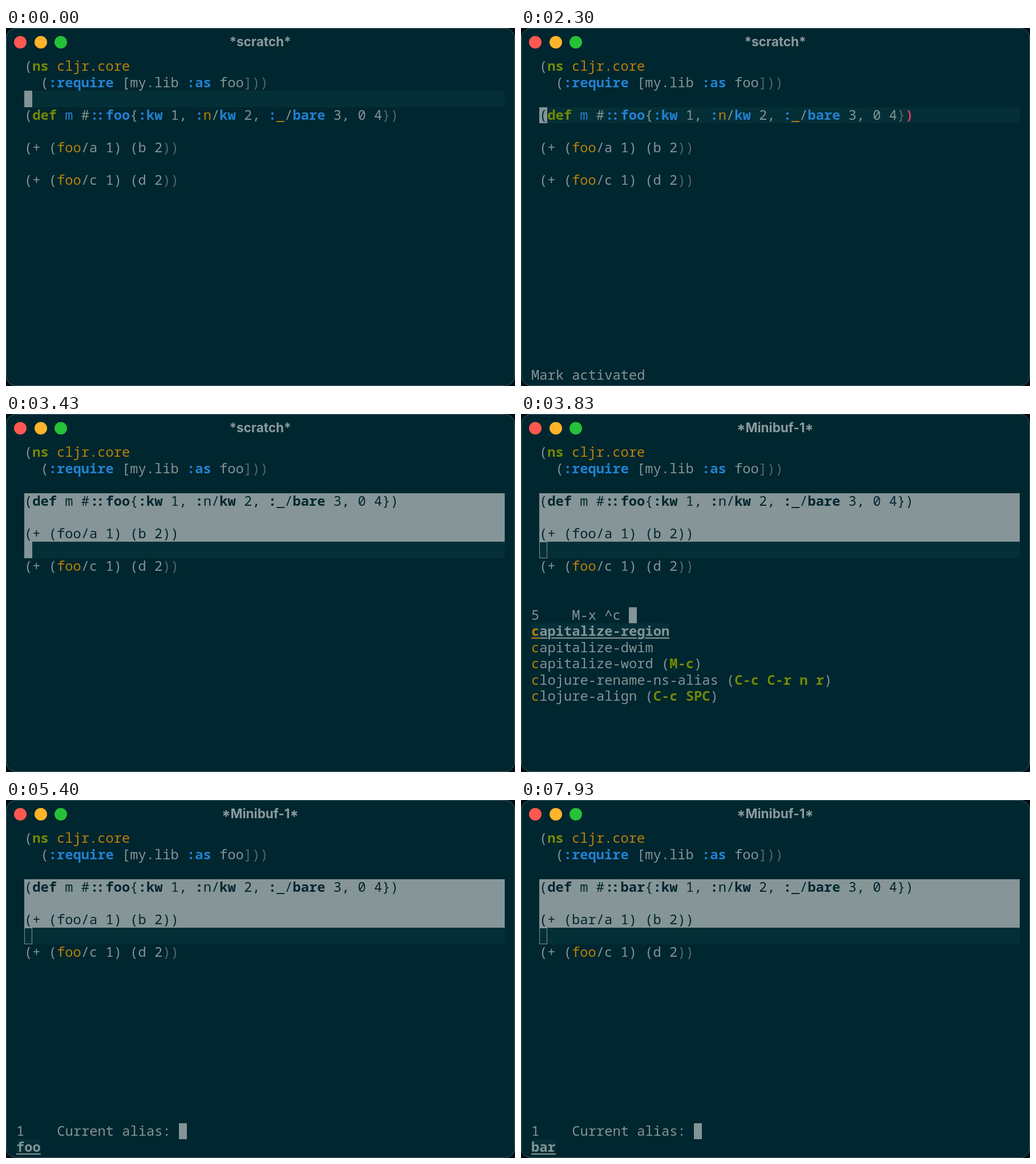
Recreate the animation shown at these times as an HTML page. Size 892 by 628 pixels, loop 8000 ms.

```html
<!DOCTYPE html>
<html lang="en">
<head>
<meta charset="utf-8">
<title>Rename alias</title>
<style>
  :root {
    --bg: #00262f; --line: #042f37; --fg: #839496; --dim: #56676b;
    --cell: 14.25px; --row: 28.53px;
  }
  html, body { margin: 0; width: 100%; height: 100%; overflow: hidden; background: #000d12; }
  #window {
    position: absolute; left: 0; top: 0; width: 892px; height: 628px; box-sizing: border-box;
    background: var(--bg); border: 1.5px solid #48626a; border-radius: 18px;
  }
  #stage { position: absolute; left: 0; top: 0; width: 892px; height: 628px; overflow: hidden; }
  .light { position: absolute; top: 14px; width: 22px; height: 22px; border-radius: 50%; }
  #title {
    position: absolute; left: 0; top: 9px; width: 891px; line-height: 30px; text-align: center;
    font: 700 22.5px/30px Inter, sans-serif; color: #8b9b9d;
  }
  .text {
    position: absolute; white-space: pre; color: var(--fg); font-variant-ligatures: none;
    font: 23.75px/28.53px "Noto Sans Mono", monospace; margin-top: -1px;
  }
  .box { position: absolute; height: var(--row); }
  .cursor { width: var(--cell); background: var(--fg); }
  .hollow { width: var(--cell); box-sizing: border-box; border: 1.5px solid var(--fg); }
  .g { color: #738a05; font-weight: 700; }
  .y { color: #b58209; }
  .b { color: #2381d0; font-weight: 700; }
  .v { color: #2381d0; }
  .d { color: var(--dim); }
  .r { color: #dc3265; font-weight: 700; }
  .k { color: var(--bg); }
  .c { color: #2381d0; font-weight: 700; letter-spacing: -4px; margin: 0 6px 0 2px; }
  .sel, .sel span { color: var(--bg); }
  .pick, .pick span {
    font-weight: 700; text-decoration: underline;
    text-decoration-thickness: 1.5px; text-underline-offset: 3px;
  }
</style>
</head>
<body>
<div id="window"></div>
<div id="stage">
  <i class="light" style="left:14px;background:#ff5850"></i>
  <i class="light" style="left:49.5px;background:#ffb429"></i>
  <i class="light" style="left:85px;background:#25c138"></i>
  <div id="title"></div>
  <div id="screen"></div>
</div>
<script>
const LOOP = 8000, CELL = 14.25, ROW = 28.53, TOP = 53.3;
const CODE_X = 32, MINI_X = 18, CODE_END = 874;

// Each step changes part of the editor state at a given time.
const steps = [
  [0, { row: 2, alias: "foo" }],
  [1270, { row: 3 }],
  [2100, { mark: true, echo: "Mark activated" }],
  [2480, { row: 4, echo: "" }],
  [2730, { row: 5 }],
  [2980, { row: 6 }],
  [3600, { mini: "command", input: "" }],
  [3690, { input: "^" }],
  [3760, { input: "^c" }],
  [3830, { input: "^c " }],
  [3900, { input: "^c a" }],
  [3970, { input: "^c al" }],
  [4050, { input: "^c ali" }],
  [4330, { input: "^c alia" }],
  [4430, { input: "^c alias" }],
  [4800, { mini: "alias", input: "" }],
  [6250, { mini: "replace" }],
  [6600, { input: "b" }],
  [6720, { input: "ba" }],
  [6840, { input: "bar" }],
  [7330, { mini: "alias", input: "", alias: "bar" }]
];

const commands = [
  ["capitalize-region"],
  ["capitalize-dwim"],
  ["capitalize-word", "M-c"],
  ["clojure-rename-ns-alias", "C-c C-r n r"],
  ["clojure-align", "C-c SPC"]
];

// x‹text› wraps text in a span of class x.
const markup = s => s.replace(/(\w)‹(.*?)›/g, '<span class="$1">$2</span>');
const rowTop = row => TOP + row * ROW;
const text = (row, x, s, cls = "") =>
  `<div class="text ${cls}" style="left:${x}px;top:${rowTop(row)}px">${markup(s)}</div>`;
const box = (row, x, width, style) =>
  `<div class="box" style="left:${x}px;top:${rowTop(row)}px;width:${width}px;background:${style}"></div>`;
const cursor = (row, x, cls = "cursor") =>
  `<div class="box ${cls}" style="left:${x}px;top:${rowTop(row)}px"></div>`;

function codeLines({ row, alias }) {
  const open = r => r === row ? "k‹(›" : "(";
  const close = r => r === row ? "r‹)›" : "d‹)›";
  return [
    "(g‹ns› y‹cljr.core›",
    "  (b‹:require› [my.lib b‹:as› food‹]))›",
    "",
    `${open(3)}g‹def› v‹m› #c‹::›b‹${alias}›{b‹:kw› 1, b‹:›y‹n›/b‹kw› 2, ` +
      `b‹:›y‹_›/b‹bare› 3, 0 4d‹}›${close(3)}`,
    "",
    `${open(5)}+ (y‹${alias}›/a 1) (b 2d‹)›${close(5)}`,
    "",
    "(+ (y‹foo›/c 1) (d 2d‹))›"
  ];
}

function drawCode(state) {
  const { row, mark, mini } = state;
  let html = box(row, CODE_X, CODE_END - CODE_X, "var(--line)");
  if (mark) for (let r = 3; r < row; r++) html += box(r, CODE_X, CODE_END - CODE_X, "#869597");
  html += cursor(row, CODE_X, mini ? "hollow" : "cursor");
  codeLines(state).forEach((line, r) => {
    html += text(r, CODE_X, line, mark && r >= 3 && r < row ? "sel" : "");
  });
  return html;
}

function prompt(row, label, input) {
  const line = label + input;
  return cursor(row, MINI_X + line.length * CELL) + text(row, MINI_X, line);
}

function candidate(row, name, key, first, match = "", initial = false) {
  let label = name;
  if (match) label = label.replace(match, `y‹${match}›`);
  if (initial) label = `y‹${name[0]}›` + label.slice(1);
  const back = first ? box(row, MINI_X, name.length * CELL, "var(--line)") : "";
  const hint = key
    ? text(row, MINI_X + (name.length + 1) * CELL, `(g‹${key}›)`) : "";
  return back + text(row, MINI_X, label, first ? "pick" : "") + hint;
}

function drawMini({ mini, input, alias, echo }) {
  if (mini === "command") {
    const match = input.split(" ")[1] || "";
    const found = commands.filter(([name]) => name.includes(match));
    return prompt(10, String(found.length).padEnd(5) + "M-x ", input) +
      found.map(([name, key], i) =>
        candidate(11 + i, name, key, i === 0, match, input.length > 1)).join("");
  }
  if (mini === "alias")
    return prompt(18, "1    Current alias: ", input) + candidate(19, alias, "", true);
  if (mini === "replace") return prompt(19, "Replace foo with: ", input);
  return echo ? text(19, MINI_X, echo) : "";
}

const title = document.getElementById("title");
const screen = document.getElementById("screen");
const start = performance.now();
let shown = -1;

function frame() {
  const time = (performance.now() - start) % LOOP;
  const past = steps.filter(([at]) => at <= time);
  if (past.length !== shown) {
    shown = past.length;
    const state = Object.assign({}, ...past.map(([, change]) => change));
    title.textContent = state.mini ? "*Minibuf-1*" : "*scratch*";
    screen.innerHTML = drawCode(state) + drawMini(state);
  }
  requestAnimationFrame(frame);
}
frame();
</script>
</body>
</html>
```
